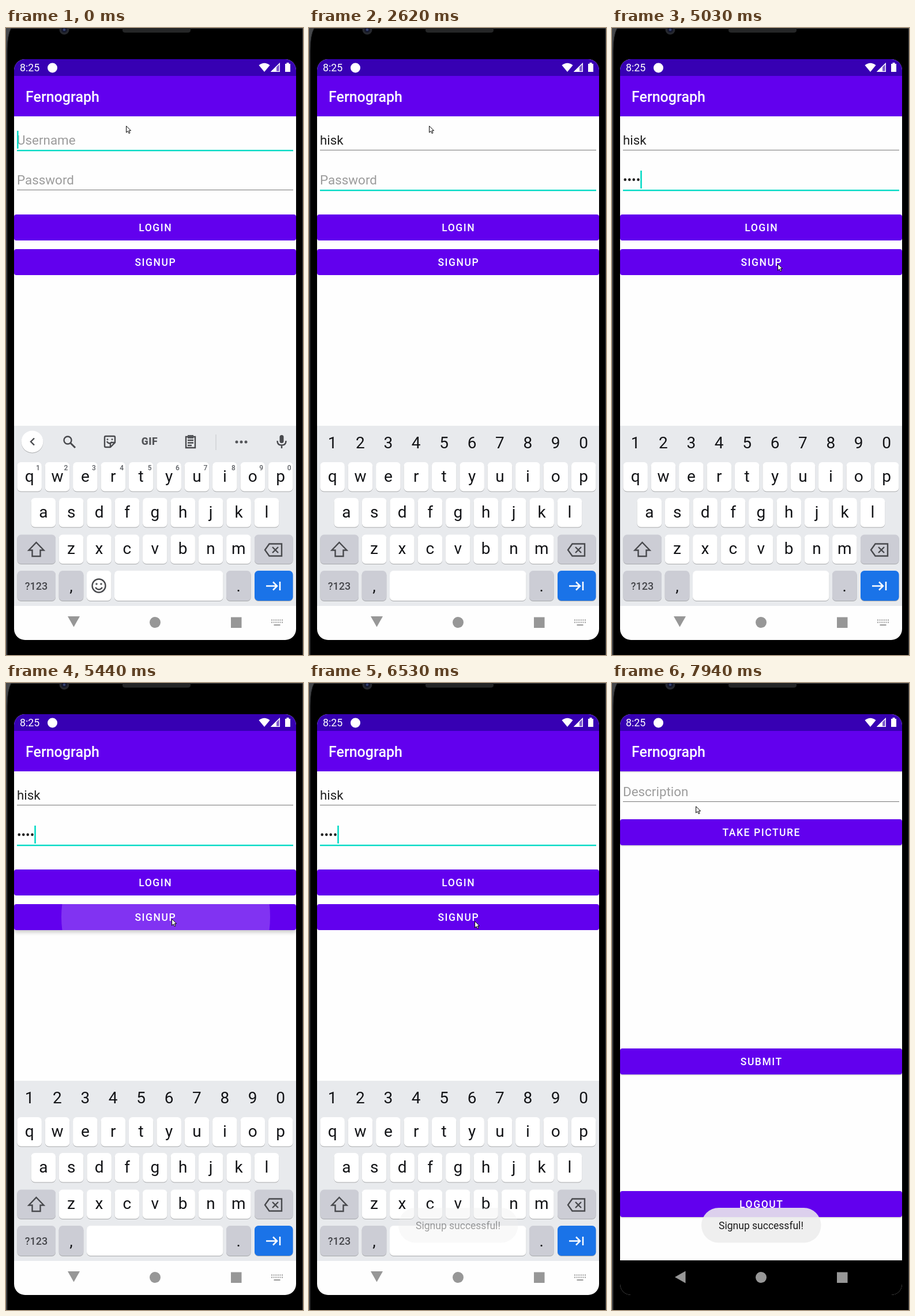
Animation, 515 px wide and 1086 px high, one loop 8 s. Source, as an HTML page:

```html
<!DOCTYPE html>
<html lang="en">
<head>
<meta charset="utf-8">
<title>Sign up</title>
<style>
  html, body { margin: 0; width: 100%; height: 100%; overflow: hidden; background: #000; }
  svg { display: block; width: 100vw; height: 100vh; font-family: Roboto, sans-serif; }
  text { white-space: pre; }
  .title { font-size: 25px; font-weight: 500; fill: #fff; }
  .field { font-size: 22.4px; fill: #212121; }
  .hint { font-size: 22.4px; fill: #9c9c9c; }
  .label { font-size: 17.5px; font-weight: 500; letter-spacing: 1.56px; fill: #fff; text-anchor: middle; }
  .btn { fill: #6200ee; }
  .raised { filter: drop-shadow(0 1.5px 1px rgba(0,0,0,.24)); }
  .pressed { filter: drop-shadow(0 4px 3px rgba(0,0,0,.2)); }
  .key { filter: drop-shadow(0 1px .4px rgba(0,0,0,.28)); }
  .letter { font-size: 28px; fill: #131417; text-anchor: middle; }
  .sup { font-size: 12px; font-weight: 500; fill: #5c5f64; text-anchor: middle; }
  .suggest { font-size: 22.6px; fill: #55585d; text-anchor: middle; }
  .icon { fill: none; stroke: #48494d; stroke-width: 2.4; }
  .solid { fill: #54565a; }
</style>
</head>
<body>
<svg id="stage" viewBox="0 0 515 1086" preserveAspectRatio="none"></svg>
<script>
const LOOP = 8000;
const TEAL = '#03dac5';

const rect = (x, y, w, h, fill, extra = '') =>
  `<rect x="${x}" y="${y}" width="${w}" height="${h}" fill="${fill}" ${extra}/>`;
const text = (x, y, cls, s, extra = '') => `<text x="${x}" y="${y}" class="${cls}" ${extra}>${s}</text>`;
const path = (d, extra = 'class="icon"') => `<path d="${d}" ${extra}/>`;
const dot = (x, y, r, extra = '') => `<circle cx="${x}" cy="${y}" r="${r}" ${extra}/>`;
const group = (id, body, extra = '') => `<g id="${id}" ${extra}>${body}</g>`;

const button = (y, label, cls = '', id = '') =>
  rect(14, y, 489, 45, '#6200ee', `rx="4" class="${cls}" ${id && `id="${id}"`}`) +
  text(259.3, y + 29, 'label', label);
const key = (x, y, w, fill = '#fff') =>
  rect(x, y, w, y > 930 ? 52 : 50.5, fill, 'rx="6.5" class="key"');
const toolbar = cls => rect(14, 83, 489, 70, '#6200ee', `class="${cls}"`) +
  text(34, 128, 'title', 'Fernograph');

function letterRow(letters, firstCenter, y) {
  return [...letters].map((c, i) => {
    const x = firstCenter + i * 48.4;
    return key(x - 21.3, y, 42.6) + text(x, y + 33.5, 'letter', c);
  }).join('');
}

function device() {
  return rect(0, 0, 515, 1086, '#000') +
    path('M0 0H9Q2 12 2 40V1086H0z', 'fill="#46484b"') +
    path('M9 0Q2 12 2 40V1086', 'fill="none" stroke="#2b2c2e"') +
    path('M2 .5H515M514.5 0V1086', 'fill="none" stroke="#4a4b4d"') +
    path('M202 0H320V4Q320 8 315 8H207Q202 8 202 4z', 'fill="#252627"') +
    dot(101, 3, 8.5, 'fill="#26282e"') + dot(101, 3, 5, 'fill="#14172b"') +
    dot(101, 3, 2.3, 'fill="#34416f"');
}

function statusBar() {
  return rect(14, 54, 489, 31, '#3700b3') +
    text(24, 75, '', '8:25', 'font-size="17.8" fill="#fff"') +
    `<g fill="#fff">${dot(80.5, 69, 8.5)}` +
    path('M438.5 64.5Q448 57 457.5 64.5L448 76z', '') +
    path('M459 76L475 60V76z', 'opacity=".35"') +
    path('M459 76L469 66V76z', '') +
    path('M460.5 75.3L474.3 61.6V75.3z', 'fill="none" stroke="#fff" stroke-width="1.3"') +
    path('M484 62H486.500V60H490.500V62H493V76H484z', '') + '</g>';
}

function login() {
  return toolbar('') +
    text(19, 202, 'hint', 'Username', 'id="userHint"') + text(19, 202, 'field', '', 'id="user"') +
    rect(19, 204, 0, 1.3, '#212121', 'id="compose"') + rect(19, 211, 479, 1, '#777', 'id="userLine"') +
    text(19, 271, 'hint', 'Password', 'id="passHint"') + text(19, 271, 'field', '', 'id="pass"') +
    rect(19, 280, 479, 1, '#777', 'id="passLine"') +
    rect(19, 178, 2.6, 31, TEAL, 'id="caret"') +
    button(323, 'LOGIN') + button(383, 'SIGNUP', '', 'signup') +
    dot(277, 405, 181, 'id="ripple" fill="#fff" fill-opacity=".2" clip-path="url(#signupClip)"');
}

function toolStrip() {
  return dot(45.5, 716.5, 19, 'fill="#fff" class="key"') + path('M49 710.5L43 716.5L49 722.5') +
    dot(107, 714, 6.5, 'class="icon"') + path('M112 719L120 727', 'class="icon" style="stroke-width:3"') +
    path('M173 707H187Q189 707 189 709V718L181 726H173Q171 726 171 724V709Q171 707 173 707zM189 718H183Q181 718 181 720V726M175 716Q178 722 184 717') +
    dot(176, 712.5, 1.5, 'class="solid"') + dot(184, 712.5, 1.5, 'class="solid"') +
    text(249, 722, 'solid', 'GIF', 'font-size="17.500" font-weight="900" text-anchor="middle" letter-spacing=".5"') +
    path('M312 708H328V727H312zM315 714H325M315 718.500H325M315 723H322') +
    rect(315, 705, 10, 6, '#54565a') + rect(363.5, 704, 1, 27, '#c6c8cc') +
    [400, 408, 416].map(x => dot(x, 717, 2.5, 'class="solid"')).join('');
}

function suggestStrip() {
  return dot(45.5, 716.5, 19, 'fill="#fff" class="key"') + path('M42 710.5L48 716.5L42 722.5') +
    rect(186, 702, 1, 30, '#bfc1c5') + rect(328, 702, 1, 30, '#bfc1c5') +
    [124, 257.5, 391].map((x, i) => text(x, 726, 'suggest', '', `id="word${i}"`)).join('');
}

function keyboard() {
  const gray = '#cccdd5';
  const digits = [...'1234567890'];
  const mic = rect(474.5, 705, 7, 14, '#48494d', 'rx="3.5"') +
    path('M470.500 715Q470.500 722.500 478 722.500T485.500 715M478 722.500V728');
  return rect(14, 689, 489, 312, '#e8eaed') +
    letterRow('qwertyuiop', 40.6, 752) + letterRow('asdfghjkl', 64.8, 814) + letterRow('zxcvbnm', 113, 877.5) +
    key(19.5, 877.5, 66.5, gray) + path('M52.500 891L65.500 904.500H59.500V915H45.500V904.500H39.500z') +
    key(431, 877.5, 66.5, gray) + path('M456.500 893.500H478V914.500H456.500L449 904zM462 899L472 909M472 899L462 909') +
    key(19.5, 940, 66.5, gray) +
    text(52.5, 973, '', '?123', 'font-size="18" font-weight="500" fill="#45464b" text-anchor="middle"') +
    key(91.7, 940, 42.6, gray) + text(113, 976, 'letter', ',') +
    key(382, 940, 42.6, gray) + text(403.3, 976, 'letter', '.') +
    key(431, 940, 66.5, '#1a73e8') +
    path('M451 966.500H469M463 959.500L470 966.500L463 973.500M475 959V974', 'fill="none" stroke="#fff" stroke-width="2.500"') +
    group('textMode',
      key(140, 940, 42.6) + dot(161, 966, 11.5, 'class="icon"') +
      dot(157, 963, 1.8, 'class="solid"') + dot(165, 963, 1.8, 'class="solid"') + path('M155 969Q161 976 167 969') +
      key(188, 940, 188.500) + mic +
      digits.map((d, i) => text(55.5 + i * 48.4, 766, 'sup', d)).join('') +
      group('tools', toolStrip()) + group('suggestions', suggestStrip())) +
    group('passMode', key(140, 940, 236.500) +
      digits.map((d, i) => text(40.5 + i * 48.4, 728, 'letter', d)).join(''));
}

function home() {
  return rect(14, 84, 489, 916, '#fefefe') + toolbar('raised') +
    text(19, 196, 'hint', 'Description') + rect(19, 205, 479, 1, '#777') +
    button(236, 'TAKE PICTURE', 'raised') + button(633, 'SUBMIT', 'raised') + button(880, 'LOGOUT', 'raised');
}

// Slivers of the outgoing screen beside the incoming one.
const slivers = rect(14, 84, 489, 66, '#6200ee') +
  rect(14, 312, 489, 54, '#6200ee', 'rx="4"') + rect(14, 374, 489, 54, '#6200ee', 'rx="4"') +
  rect(14, 1000, 489, 60, '#000') + path('M14.500 1000V1021M502.500 1000V1021', 'stroke="#555"');

const stage = document.getElementById('stage');
stage.innerHTML =
  `<defs><clipPath id="screenClip">${rect(14, 54, 489, 1006, '#000', 'rx="19"')}</clipPath>` +
  `<clipPath id="signupClip">${rect(14, 383, 489, 45, '#000', 'rx="4"')}</clipPath></defs>` +
  device() +
  group('screen',
    rect(14, 54, 489, 1006, '#fefefe') + statusBar() +
    group('login', login() + keyboard()) +
    group('slivers', slivers) +
    group('homeBase', rect(14, 1000, 489, 60, '#000')) + group('home', home()) +
    group('nav', path('M107 1019H128L117.500 1037.500z', 'id="back"') + dot(258.5, 1029.5, 9.5) +
      rect(390, 1020.5, 18.5, 18.5, 'inherit', 'style="fill:inherit"')) +
    group('imeIcon', path('M460 1025.500H480M460 1029.500H480', 'stroke="#999" stroke-width="2" stroke-dasharray="2 1.600"') +
      path('M464.500 1034H475.500', 'stroke="#999" stroke-width="2"')) +
    group('toast', rect(155, 909, 207.5, 60.5, '#ededed', 'rx="30" fill-opacity=".88"') +
      text(258.5, 946, '', 'Signup successful!', 'font-size="17.500" fill="#1c1c1c" text-anchor="middle"')),
    'clip-path="url(#screenClip)"') +
  path('M.6 .8V12L3.300 9.500L5.200 13.600L7 12.800L5.200 8.800H8.600z',
    'id="pointer" fill="#fff" stroke="#000" stroke-width="1" stroke-linejoin="round"');

const el = Object.fromEntries([...stage.querySelectorAll('[id]')].map(n => [n.id, n]));

// Each track holds its value until the next time.
const tracks = {
  caret: [[0, 1], [120, 0], [660, 1], [2620, 0], [2770, 1], [3550, 0], [4110, 1], [4640, 0], [5030, 1], [5560, 0], [6010, 1]],
  user: [[0, ''], [940, 'h'], [1210, 'hi'], [1370, 'his'], [1510, 'hisk']],
  composed: [[0, 0], [1210, 1], [1370, 2], [1510, 3], [1640, 4], [2060, 0]],
  words: [[0, null], [1370, ['hi', 'him', 'High']], [1510, ['his', 'hiss', 'Hisk']], [1640, ['hisk', 'Hisk', 'risk']]],
  pass: [[0, ''], [2770, 'h'], [2890, '•i'], [3010, '••s'], [3160, '•••k'], [4640, '••••']],
  ripple: [[0, 0], [5440, 181], [5560, 270], [5710, 0]],
  toast: [[0, 0], [6530, .42], [6650, 1]],
  turn: [[0, 0], [6650, 8], [6780, 82], [6930, 90]],
  pointer: [[0, [208, 169]], [4510, [212, 180]], [4640, [246, 250]], [4770, [287, 338]], [4910, [287, 386]],
    [5030, [287, 408]], [5870, [287, 409]], [6290, [287, 412]], [6650, [291, 416]], [7520, [285, 396]],
    [7640, [263, 358]], [7790, [188, 261]], [7940, [145, 213]]]
};
const at = (name, t) => tracks[name].findLast(([start]) => start <= t)[1];
const show = (node, on) => { node.style.display = on ? '' : 'none'; };
const set = (node, attrs) => { for (const k in attrs) node.setAttribute(k, attrs[k]); };
const write = (node, s) => { if (node.textContent !== s) node.textContent = s; };
const line = (node, focused) => set(node, { height: focused ? 2.4 : 1, fill: focused ? TEAL : '#777' });

function draw(t) {
  const onPass = t >= 2060, entering = t >= 6650 && t < 6780, atHome = t >= 6650;
  const user = at('user', t), pass = at('pass', t), words = at('words', t);

  show(el.login, !atHome);
  show(el.imeIcon, !atHome);
  show(el.home, atHome);
  show(el.homeBase, atHome);
  show(el.slivers, entering);
  set(el.home, { transform: entering ? 'translate(258.5 527) scale(.9952) translate(-258.5 -527)' : '' });

  if (!atHome) {
    write(el.user, user);
    write(el.pass, pass);
    show(el.userHint, !user);
    show(el.passHint, !pass);
    line(el.userLine, !onPass);
    line(el.passLine, onPass);
    const count = at('composed', t);
    set(el.compose, { width: count ? el.user.getSubStringLength(0, count) : 0 });
    const typed = onPass ? el.pass : el.user;
    const width = typed.textContent ? typed.getComputedTextLength() : 0;
    set(el.caret, { x: 19 + width, y: onPass ? 247 : 178 });
    show(el.caret, at('caret', t));

    show(el.textMode, t < 2210);
    show(el.passMode, t >= 2210);
    show(el.tools, !words);
    show(el.suggestions, words);
    if (words) words.forEach((w, i) => write(el['word' + i], w));

    const radius = at('ripple', t);
    set(el.ripple, { r: radius });
    set(el.signup, { class: radius === 181 ? 'pressed' : '' });
  }

  set(el.toast, { opacity: at('toast', t) });
  set(el.nav, { fill: entering ? '#464646' : '#979797' });
  set(el.back, { transform: `rotate(${at('turn', t)} 117.5 1029)` });
  set(el.pointer, { transform: `translate(${at('pointer', t)})` });
}

function tick() {
  draw(performance.now() % LOOP);
  requestAnimationFrame(tick);
}
tick();
</script>
</body>
</html>
```
